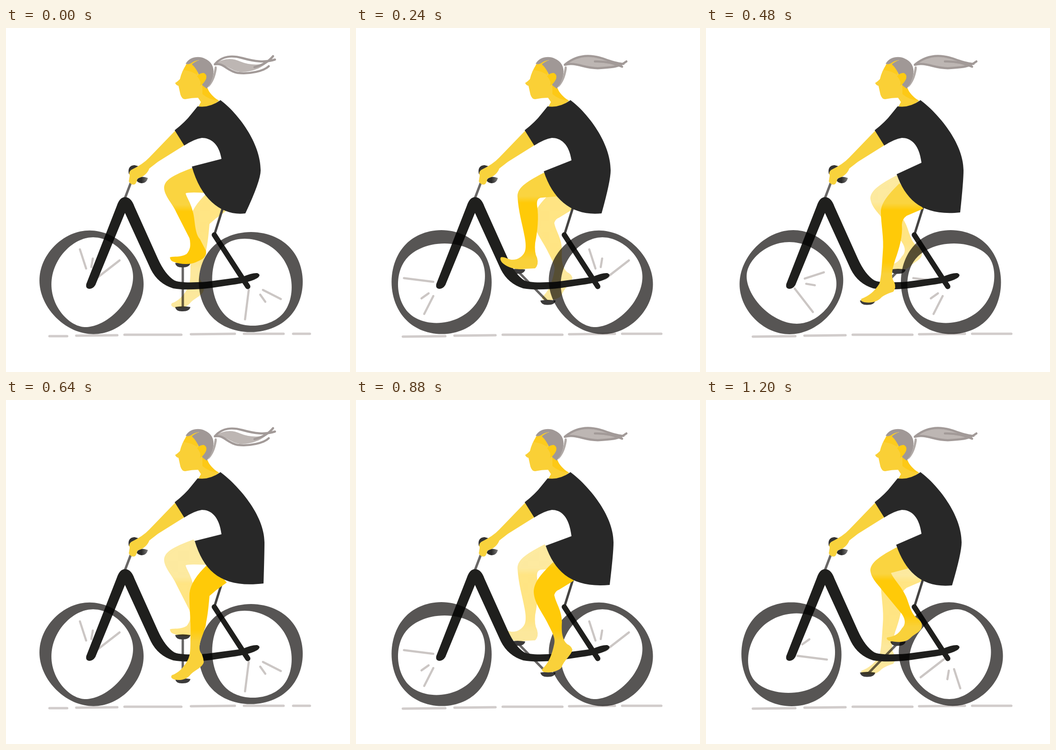
An HTML page with a canvas that plays this animation: 720x720 px, repeating every 1.28 s.

```html
<!DOCTYPE html>
<html lang="en">
<head>
<meta charset="utf-8">
<title>Cyclist</title>
<style>
html, body { margin: 0; height: 100%; overflow: hidden; background: #fff; }
canvas { display: block; width: 100vw; height: 100vh; }
</style>
</head>
<body>
<canvas id="stage" width="720" height="720"></canvas>
<script>
const ctx = document.getElementById('stage').getContext('2d');
const TAU = Math.PI * 2, STEP = 80, STEPS = 16;

function fill(path, color) {
  ctx.fillStyle = color;
  ctx.fill(typeof path === 'string' ? new Path2D(path) : path);
}
function stroke(path, color, width) {
  ctx.strokeStyle = color;
  ctx.lineWidth = width;
  ctx.stroke(new Path2D(path));
}

// Wobbly outline from a support function: mean plus [harmonic, cos, sin] terms.
function outline(mean, terms) {
  const p = new Path2D();
  for (let i = 0; i < 120; i++) {
    const a = i / 120 * TAU;
    let h = mean, d = 0;
    for (const [n, c, s] of terms) {
      h += c * Math.cos(n * a) + s * Math.sin(n * a);
      d += n * (s * Math.cos(n * a) - c * Math.sin(n * a));
    }
    p.lineTo(h * Math.cos(a) - d * Math.sin(a), h * Math.sin(a) + d * Math.cos(a));
  }
  p.closePath();
  return p;
}
const rim = outline(107.75, [[1, 0, .25], [2, .25, 2], [4, 1, 0]]);
rim.addPath(outline(88.4, [[1, 0, -.8], [2, -4.25, -3.9], [3, 1.5, -.8], [4, 1.3, 0]]));
const spokes = 'M-22-70L-9-30M5-51L2-33M61-47L12-9';

// Runs draw in the turning space of both wheels, around the front centre x, y.
function onWheels(step, x, y, draw) {
  for (const [dx, phase] of [[0, step], [333.5, step + 5]]) {
    ctx.save();
    ctx.translate(x + dx, y);
    ctx.rotate(-phase * TAU / 8);
    draw();
    ctx.restore();
  }
}

// Leg poses around one crank turn: path, end of the thigh tone, start of the foot tone.
const legs = [
  ['M392 292C350 308 330 318 331 336C332 352 350 370 357 387L384 440C388 455 385 465 378 473C365 481 350 477 343 480Q344 487 350 489C365 495 385 496 398 490C412 484 422 478 418 465Q410 450 406 442C395 430 396 405 392 388C387 365 378 355 376 346Q380 343 418 345L430 330Z', 378, 600],
  ['M395 302C360 320 338 333 338 352C340 385 348 410 352 432C356 450 356 462 353 469C348 479 338 486 325 485C315 483 310 478 303 480Q300 486 308 493C320 503 340 507 355 504L375 503Q383 495 379 481Q373 470 375 450C380 425 383 395 379 372C378 362 380 355 390 355L425 352Z', 360, 470],
  ['M402 316C375 337 347 350 347 370C347 395 356 425 354 450C352 478 354 490 350 495C338 512 325 525 307 529Q303 533 310 536C320 542 330 544 342 541L362 525Q380 522 379 512C378 500 372 492 374 478C380 450 390 425 387 400C386 385 385 376 392 374L440 365Z', 372, 485],
  ['M405 325C385 345 366 365 366 385C366 410 373 440 370 470C368 500 367 520 363 535C352 552 342 560 325 567Q322 572 332 574C345 576 358 574 368 563Q376 557 392 552Q399 543 394 532C386 520 390 505 396 485C405 460 412 435 410 412Q410 400 420 393L455 378Z', 375, 500],
  ['M420 346C400 365 386 385 384 405C383 430 388 470 386 500C386 520 386 535 380 545C372 560 360 572 347 576Q343 582 352 585C365 588 378 585 386 575C395 565 412 560 414 548Q413 540 410 532C400 520 407 505 414 485C422 460 424 430 426 410L440 398L462 382L430 345Z', 320, 490],
  ['M412 340C390 362 372 380 372 402C373 425 390 445 400 465C410 485 418 498 415 510C410 535 402 552 390 563Q387 569 398 570C412 571 425 566 430 560C435 545 450 535 453 523Q451 515 442 511C430 500 430 480 431 465C431 440 418 425 415 408Q417 400 425 397L456 378L430 345Z', 345, 490],
  ['M412 333C388 353 362 370 361 384C362 400 375 415 388 430C405 450 425 470 431 488C433 500 428 510 420 518C410 526 400 526 390 526Q387 531 394 534C408 540 425 539 435 532C445 523 462 522 464 510Q462 500 452 494C442 486 440 470 437 455C430 433 414 408 404 391Q404 386 413 384L446 371L430 345Z', 360, 480],
  ['M400 308C365 326 344 340 344 357C346 375 362 388 372 402L410 448C418 460 418 470 410 478C402 492 392 495 379 497Q376 501 384 504C400 508 418 508 428 498C438 488 452 485 452 472Q452 463 440 455C428 445 425 425 418 410C410 392 395 378 387 362L425 352Z', 372, 460]
];

function leg(pose) {
  const [path, thigh, foot] = legs[pose % 8];
  const tone = ctx.createLinearGradient(0, 280, 0, 620);
  const stop = (y, c) => tone.addColorStop((y - 280) / 340, c);
  stop(thigh - 8, '#fad440');
  stop(thigh + 6, '#ffca08');
  stop(foot - 10, '#ffca08');
  stop(foot + 15, '#f9d13a');
  fill(path, tone);
}

// Dress per pose: front hem x, y; lap y; back hem x, y; widest x.
const hems = [
  [389, 290, 274, 501, 388, 533], [393, 300, 277, 514, 388, 533],
  [400, 313, 283, 520, 388, 535], [399, 306, 282, 532, 386, 539],
  [395, 295, 281, 539, 384, 541], [397, 305, 285, 531, 387, 539],
  [403, 320, 289, 520, 388, 539], [398, 303, 280, 515, 388, 535]
];
function dress([fx, fy, lap, bx, by, w]) {
  fill(`M401 164Q425 168 449 151C485 178 ${w} 240 ${w} 298Q${w} 320 ${bx} ${by}
    C455 394 ${fx + 20} 362 ${fx} ${fy}L451 ${lap}C446 242 428 230 410 230
    Q395 232 373 246L353 214Q375 197 388 180Z`, '#282828');
}

const tails = [
  { body: 'M437 76C455 62 475 63 490 70C510 78 530 78 546 73C532 86 510 93 490 92C470 90 460 73 437 76Z',
    lines: 'M438 75C452 58 474 57 495 63C520 70 542 73 563 66M437 76C456 72 462 90 485 94C510 97 540 90 550 80M520 82Q545 76 559 59' },
  { body: 'M437 77C460 58 490 56 515 66L558 79C530 84 500 88 478 80Q460 74 437 77Z',
    lines: 'M438 76C460 58 485 55 510 62C530 68 545 75 560 75M437 77C460 70 480 86 510 84C535 82 550 82 566 70M500 70Q530 69 557 81' },
  { body: 'M437 76C462 56 512 52 538 67C524 70 520 74 515 78C490 80 455 90 437 76Z',
    lines: 'M438 76C462 54 520 48 548 70M437 75C455 90 490 80 515 77Q538 74 562 83M520 77Q542 78 557 88' }
];
const tailOrder = [0, 1, 2, 1];

const grounds = [
  'M91 645H128M147 644L233 643M248 642H367M387 641L479 640M498 640H581M601 640H636',
  'M98 646L187 645M206 644L292 643M307 642H432M446 641L542 640M557 640H639'
];

function crank(pose) {
  ctx.save();
  ctx.translate(370, 541);
  for (const side of [0, 4]) {
    const a = -(pose + side + 2) * TAU / 8;
    const x = 45 * Math.cos(a), y = 46 * Math.sin(a);
    stroke(`M0 0L${x} ${y}`, '#666463', 5);
    fill(`M${x - 16} ${y - 3}Q${x} ${y - 6} ${x + 16} ${y - 3}Q${x + 14} ${y + 6} ${x} ${y + 6}Q${x - 14} ${y + 7} ${x - 16} ${y - 3}Z`, '#3c3b3b');
  }
  ctx.restore();
}

function frame() {
  stroke('M454 376L437 430', '#454443', 5);
  stroke('M262 322L249 356', '#6a6867', 5);
  fill('M168 536L232 372Q238 354 249 354Q262 354 269 374L318 483Q333 516 352 528Q365 535 420 531L495 521Q515 512 526 513Q534 516 528 522Q515 532 470 538L430 544Q380 550 350 545Q318 535 303 505L249 387L187 538Q182 546 174 546Q166 545 168 536Z', '#1f1f1d');
  stroke('M436 433L506 541', '#1f1f1d', 11);
}

function upperBody() {
  // handlebar and arm
  fill('M257 305Q254 288 269 287Q281 289 284 297L268 310Z', '#343333');
  const grip = ctx.createLinearGradient(274, 0, 298, 0);
  grip.addColorStop(.4, '#2b2b2b');
  grip.addColorStop(1, '#858382');
  fill('M273 319Q280 307 297 314Q294 325 284 325Q276 324 273 319Z', grip);
  fill('M355 214L300 271Q287 285 262 297Q256 302 259 309L257 321Q262 330 270 327Q274 323 275 315Q294 310 300 294L318 280L374 245Z', '#f8d23c');
  // head
  fill('M377 77Q368 90 364 107Q358 113 354 115Q356 120 361 121Q363 130 365 139Q368 149 375 149Q389 146 402 146L408 155L403 164Q425 170 446 152Q428 143 421 126L425 85L400 66Z', '#fad036');
  fill('M372 88L377 76L408 66L400 98Q388 90 372 88Z', '#fdcb1d');
  fill('M411 120L422 126Q425 137 444 152Q424 150 411 138Z', '#fdc916');
  fill('M376 75C384 60 404 58 416 64C430 70 436 82 434 96C432 112 426 120 420 127L411 120L405 100Q398 84 389 76Q397 69 406 67Q394 68 387 74Q381 77 376 75Z', '#a09896');
  fill('M400 101Q405 94 414 94Q421 97 419 106Q414 117 406 121Q410 112 400 101Z', '#fdcb12');
  fill('M437 81Q442 78 441 86Q437 112 423 125Q434 105 437 81Z', '#b1aaa7');
}

function draw(step) {
  const pose = step >> 1;
  ctx.globalCompositeOperation = 'source-over';
  fill('M0 0H720V720H0Z', '#fff');
  ctx.lineCap = ctx.lineJoin = 'round';
  stroke(grounds[pose % 2], '#d1cccb', 5);
  onWheels(step, 176.7, 533.4, () => stroke(spokes, '#cbc6c4', 4.5));
  crank(pose);

  ctx.globalCompositeOperation = 'multiply';
  ctx.globalAlpha = .5;
  leg(pose + 4);
  ctx.globalAlpha = 1;
  ctx.globalCompositeOperation = 'source-over';
  frame();

  ctx.globalCompositeOperation = 'multiply';
  onWheels(step, 179, 532, () => {
    ctx.fillStyle = '#575554';
    ctx.fill(rim, 'evenodd');
  });
  ctx.globalCompositeOperation = 'source-over';

  leg(pose);
  upperBody();
  dress(hems[pose]);
  const tail = tails[tailOrder[pose % 4]];
  fill(tail.body, '#bdb6b3');
  stroke(tail.lines, '#a29a98', 4.5);
}

function tick() {
  draw(Math.floor(performance.now() / STEP) % STEPS);
  requestAnimationFrame(tick);
}
tick();
</script>
</body>
</html>
```
